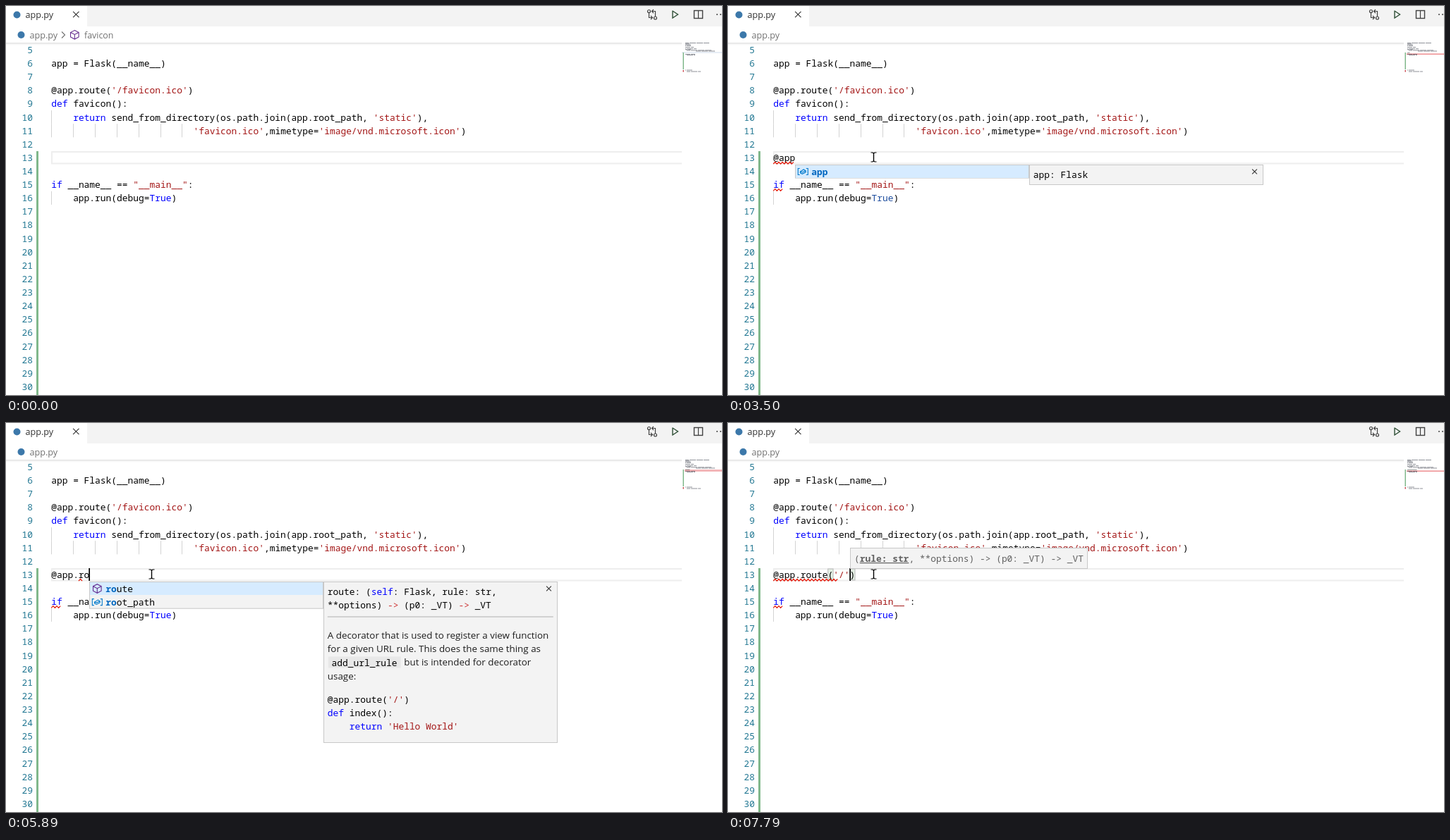
Recreate the animation shown at these times as an HTML page with a canvas. Size 1015 by 552 pixels, loop 8000 ms.

```html
<!DOCTYPE html>
<html lang="en">
<head>
<meta charset="utf-8">
<title>Editor completion</title>
<style>
html, body { margin: 0; width: 100%; height: 100%; overflow: hidden; background: #fff; }
canvas { display: block; }
</style>
</head>
<body>
<canvas id="stage" width="1015" height="552"></canvas>
<script>
const g = document.getElementById('stage').getContext('2d');
const LOOP = 8000, CW = 7.74, LH = 19.12, X0 = 64.2;
const MONO = '12.9px "Noto Sans Mono", monospace';
const UI = '"Open Sans", "Noto Sans", sans-serif';
const BLUE = '#0000ff', RED = '#a31515', PURPLE = '#652d90';

const colX = c => X0 + c * CW;
const rowY = n => 62 + (n - 5) * LH;

const code = {
  6: 'app = Flask(__name__)',
  8: "@app.route('/favicon.ico')",
  9: 'def favicon():',
  10: "    return send_from_directory(os.path.join(app.root_path, 'static'),",
  11: ' '.repeat(26) + "'favicon.ico',mimetype='image/vnd.microsoft.icon')",
  15: 'if __name__ == "__main__":',
  16: '    app.run(debug=True)'
};

// time, text on line 13, caret column (end of text if omitted)
const typing = [
  [0, ''], [2390, '@'], [2550, '@a'], [2700, '@ap'], [2780, '@app'],
  [4200, '@app.'], [5800, '@app.r'], [5890, '@app.ro'], [6040, '@app.rou'],
  [6110, '@app.rout'], [6190, '@app.route'], [6510, '@app.route()', 11],
  [7150, "@app.route('')", 12], [7310, "@app.route('/')", 13], [7460, "@app.route('/')", 14]
];
const caretOn = [[1460, 1990], [2390, 3330], [3820, 4670], [5210, 5660], [5800, 6980], [7150, 8000]];
const mousePath = [
  [70, 807, 491], [220, 843, 400], [320, 844, 340], [450, 833, 298],
  [690, 833, 298], [840, 690, 240], [1000, 440, 195], [1150, 280, 194], [1310, 212, 207],
  [1400, 212, 207], [1550, 209, 211], [1870, 209, 211], [1990, 206, 214]
];

// a leading "=" marks an attribute, otherwise a method
const routeList = ['route', 'run', 'save_session', '=secret_key', 'select_jinja_autoescape',
  '=send_file_max_age_default', 'send_static_file', '=session_cookie_name', '=session_interface',
  'shell_context_processor', '=shell_context_processors', 'should_ignore_error'];
const nameList = ['=app', 'abs', 'all', 'any', 'ascii', '=and', '=as', '=assert', '=async', '=await',
  '=ArithmeticError', '=AssertionError'];
const rList = ['route', 'run', 'register_blueprint', 'register_error_handler', '=request_class',
  '=response_class', '=root_path'];

// from, to, column, items, matched letters, docs kind, docs start
const popups = [
  [2630, 2700, 2, nameList, 1], [2700, 2780, 3, ['=app'], 2],
  [2780, 4200, 4, ['=app'], 3, 'app', 2860],
  [4280, 5800, 5, routeList, 0, 'route', 4370],
  [5800, 5890, 6, rList, 1, 'route', 0],
  [5890, 6040, 7, ['route', '=root_path'], 2, 'route', 0],
  [6040, 6110, 8, ['route'], 3, 'route', 0],
  [6110, 6190, 9, ['route'], 4, 'route', 0],
  [6190, 6510, 10, ['route'], 5, 'route', 0]
];
const squiggles = [[3500, 4810, 13, 0, 4], [4810, 6040, 13, 5, 6], [7620, 8000, 13, 0, 12], [3500, 8000, 15, 0, 2]];

const within = (t, a, b) => t >= a && t < b;

function rect(x, y, w, h, color) {
  g.fillStyle = color;
  g.fillRect(x, y, w, h);
}

function panel(x, y, w, h) {
  rect(x, y, w, h, '#c8c8c8');
  rect(x + 1, y + 1, w - 2, h - 2, '#f3f3f3');
}

// y is the middle of the line
function text(s, x, y, color = '#000', font = MONO, align = 'left') {
  g.font = font;
  g.textAlign = align;
  g.fillStyle = color;
  g.fillText(s, x, Math.round(y + 4.9));
}

function line(points, color, width = 1) {
  g.strokeStyle = color;
  g.lineWidth = width;
  g.beginPath();
  points.forEach(([x, y], i) => i ? g.lineTo(x, y) : g.moveTo(x, y));
  g.stroke();
}

function dot(x, y, r, color) {
  g.fillStyle = color;
  g.beginPath();
  g.arc(x, y, r, 0, 7);
  g.fill();
}

function cross(x, y, r, color = '#333') {
  line([[x - r, y - r], [x + r, y + r]], color, 1.1);
  line([[x - r, y + r], [x + r, y - r]], color, 1.1);
}

function source(s, x, y, boolColor = BLUE) {
  const parts = s.split(/('[^']*'|"[^"]*"|\b(?:def|return|if|True|self)\b)/);
  let col = 0;
  parts.forEach((p, i) => {
    const color = i % 2 === 0 ? '#000' : /^['"]/.test(p) ? RED : p === 'True' ? boolColor : BLUE;
    if (p.trim()) text(p, x + col * CW, y, color);
    col += p.length;
  });
}

function cube(x, y, color = PURPLE) {
  line([[x, y - 6.3], [x + 5.8, y - 3.3], [x + 5.8, y + 3.2], [x, y + 6.3],
    [x - 5.8, y + 3.2], [x - 5.8, y - 3.3], [x, y - 6.3], [x + 5.8, y - 3.3]], color, 1.1);
  line([[x - 5.8, y - 3.3], [x, y - .3], [x + 5.8, y - 3.3]], color, 1.1);
  line([[x, y - .3], [x, y + 6.3]], color, 1.1);
}

function field(x, y) {
  const c = '#007acc';
  for (const s of [-1, 1])
    line([[x + s * 4.5, y - 4.5], [x + s * 7, y - 4.5], [x + s * 7, y + 4.5], [x + s * 4.5, y + 4.5]], c, 1.1);
  line([[x - 3.8, y], [x + 1, y - 3], [x + 3.8, y - 1.2], [x + 3.8, y + .8], [x - 1, y + 3.3],
    [x - 3.8, y + 1.8], [x - 3.8, y], [x - 1, y + 1], [x + 3.8, y - 1.2]], c, 1.1);
}

function squiggle(x1, x2, y) {
  const pts = [];
  for (let x = x1, i = 0; x <= x2; x += 2.6, i++) pts.push([x, y + (i % 2 ? -1.3 : 1.3)]);
  line(pts, '#e51400', 1.2);
}

function header(t) {
  rect(0, 0, 1015, 29, '#f3f3f3');
  rect(0, 0, 115, 29, '#fff');
  dot(15.5, 12.5, 5, '#3c78aa');
  text('app.py', 27.5, 12.5, '#333', '12.6px ' + UI);
  cross(99.3, 12, 4.2);

  dot(21.5, 41, 5, '#3c78aa');
  text('app.py', 33.5, 41.3, '#717171', '12.6px ' + UI);
  if (t < 3190) {
    line([[79, 36.5], [83.5, 41], [79, 45.5]], '#717171', 1.1);
    cube(97.3, 40.8);
    text('favicon', 111, 41.3, '#717171', '12.4px ' + UI);
  }
  ['#e4e4e4', '#eeeeee', '#f7f7f7', '#fcfcfc'].forEach((c, i) => rect(0, 52 + i, 958, 1, c));

  const c = '#424242';
  g.strokeStyle = c;
  g.lineWidth = 1.2;
  for (const [x, y] of [[911.5, 7.5], [920.5, 17]]) {
    g.beginPath();
    g.arc(x, y, 2, 0, 7);
    g.stroke();
  }
  line([[911.5, 9.5], [911.5, 16.5], [916, 16.5]], c, 1.2);
  line([[914, 14], [916.5, 16.5], [914, 19]], c, 1.2);
  line([[920.5, 15], [920.5, 7.5], [916, 7.5]], c, 1.2);
  line([[918, 5], [915.5, 7.5], [918, 10]], c, 1.2);
  line([[945, 7], [952.5, 12], [945, 17], [945, 6.5]], '#2f4f36', 1.4);
  g.strokeStyle = c;
  g.strokeRect(975.5, 6.5, 12, 11);
  line([[981.5, 6.5], [981.5, 17.5]], c, 1.2);
  dot(1008, 12, 1, c);
  dot(1013, 12, 1, c);
}

function minimap(t, length) {
  const marks = [[52, 0, 34], [53.3, 0, 5], [54.5, 0, 8], [55.8, 0, 7], [58, 0, 12], [60.2, 0, 15],
    [61.3, 0, 8], [62.4, 2, 36], [63.5, 15, 28], [68, 0, 14], [69.2, 2, 12], [90.5, 0, 9], [92.5, 2, 20]];
  if (t < 3500) rect(958, 65.5, 57, 1, '#cfdcec');
  else {
    const wide = within(t, 4810, 6040);
    rect(962, wide ? 66 : 67.5, 53, wide ? 3 : 1.5, wide ? '#f3b5b8' : '#ee8d90');
  }
  for (const [y, x, w] of marks)
    for (let i = 0; i < w; i += 2)
      rect(963 + x + i, y, (i * 7 + y | 0) % 5 ? 1.8 : 1, 1, 'rgba(30,35,50,.55)');
  if (length) rect(963, 65.7, length * .9, 1, 'rgba(40,40,40,.5)');
  rect(959.5, 66, 1.5, 24, '#81b88b');
  rect(959.5, 91, 1.5, 2.5, '#ca4b51');
}

function editor(t, typed, caret) {
  for (let n = 5; n <= 30; n++) text(n, 38, rowY(n), '#237893', MONO, 'right');
  rect(43, 206, 3, 346, '#81b88b');

  rect(64, 206, 894, 2, '#eeeeee');
  rect(64, 222.5, 894, 2, '#eeeeee');
  rect(64, 206, 2, 18, '#eeeeee');

  for (const [n, count] of [[10, 1], [11, 7], [16, 1]])
    for (let i = 0; i < count; i++)
      rect(Math.floor(colX(i * 4)), rowY(n) - 9.5, 1, LH, '#d3d3d3');

  const boolColor = within(t, 2860, 4280) ? '#1f4e9e' : BLUE;
  for (const n in code) source(code[n], X0, rowY(+n), boolColor);

  if (caret === 11 || caret === 14)
    for (const c of [10, typed.length - 1]) {
      rect(colX(c) - .4, 206.5, CW + .6, 17, '#b9b9b9');
      rect(colX(c) + .6, 207.5, CW - 1.4, 15, '#e4f0e4');
    }
  source(typed, X0, rowY(13));
  for (const [a, b, n, c1, c2] of squiggles)
    if (within(t, a, b)) squiggle(colX(c1), colX(c2), rowY(n) + 7.8);
  if (caretOn.some(([a, b]) => within(t, a, b))) rect(Math.round(colX(caret)) - .7, 206, 1.7, 18, '#000');
}

function docs(x, kind, t) {
  const tx = x + 5.8;
  if (kind === 'app') {
    panel(x, 225, 332, 29);
    text('app: Flask', tx, 239);
  } else {
    panel(x, 225, 332, 229);
    source('route: (self: Flask, rule: str,', tx, 239);
    text('**options)    (p0: _VT)    _VT', tx, 258);
    for (const c of [11, 24]) text('->', tx + c * CW, 258, t < 5800 ? '#000' : '#cd3131');
    rect(tx, 274.5, 320, 1, '#b0b0b0');
    const prose = (s, px, y) => text(s, px, y, '#1e1e1e', '13.4px ' + UI);
    prose('A decorator that is used to register a view function', tx, 301);
    prose('for a given URL rule. This does the same thing as', tx, 320.5);
    rect(tx + 1, 331.5, 103, 16, '#e8e8e8');
    text('add_url_rule', tx + 5.8, 339.8);
    prose('but is intended for decorator', tx + 108.5, 339.5);
    prose('usage:', tx, 359);
    source("@app.route('/')", tx, 392);
    source('def index():', tx, 411);
    source("    return 'Hello World'", tx, 430);
    if (t < 5430) rect(x + 320.5, 226, 10.5, 90.5, '#c6c6c6');
  }
  cross(x + 319.5, 235, 3.4);
}

function suggest([, , col, items, matched, kind, start], t) {
  const x = Math.floor(colX(col));
  panel(x, 225, 332, items.length * 19.1 + .5);
  rect(x + 1, 226, 330, 18, '#d6ebff');
  items.forEach((item, i) => {
    const y = 235 + i * LH;
    const name = item.replace('=', '');
    if (item[0] === '=') field(x + 11.3, y);
    else cube(x + 11.3, y);
    const head = name.slice(0, matched);
    text(head, x + 23.3, y, '#0066bf', 'bold ' + MONO);
    text(name.slice(matched), x + 23.3 + matched * CW, y);
  });
  if (items === routeList) rect(x + 321, 343, 10, 19, t < 5040 ? '#c6c6c6' : '#d0d0d0');
  if (kind && t >= start) docs(x + 332, kind, t);
}

function signature(col) {
  const x = Math.round(colX(col) + .4), tx = x + 6, y = 192.5, c = '#616161';
  panel(x, 177, 337, 30);
  text('(', tx, y, c);
  text('rule: str', tx + CW, y, c, 'bold ' + MONO);
  rect(tx + CW, 198, CW * 9, 1.2, c);
  text(', **options) -> (p0: _VT) -> _VT', tx + CW * 10, y, c);
}

function mouse(t) {
  if (t < mousePath[0][0]) return;
  let i = mousePath.findIndex(p => p[0] > t);
  if (i < 0) i = mousePath.length - 1;
  const [ta, xa, ya] = mousePath[i - 1], [tb, xb, yb] = mousePath[i];
  const k = Math.min(1, (t - ta) / (tb - ta));
  const x = Math.round(xa + (xb - xa) * k) + .5, y = Math.round(ya + (yb - ya) * k) + .5;
  line([[x, y - 6], [x, y + 6]], '#000', 1.4);
  for (const s of [-1, 1])
    line([[x - 4, y + s * 6.5], [x - 1.5, y + s * 6.5], [x, y + s * 5.5],
      [x + 1.5, y + s * 6.5], [x + 4, y + s * 6.5]], '#000', 1.2);
}

function draw(t) {
  rect(0, 0, 1015, 552, '#fff');
  const [, typed, at] = typing.filter(e => e[0] <= t).pop();
  const caret = at || typed.length;
  editor(t, typed, caret);
  header(t);
  minimap(t, typed.length);
  popups.filter(p => within(t, p[0], p[1])).forEach(p => suggest(p, t));
  if (within(t, 6590, 7460) || t >= 7790) signature(caret);
  mouse(t);
}

const began = performance.now();
function tick() {
  draw((performance.now() - began) % LOOP);
  requestAnimationFrame(tick);
}
tick();
</script>
</body>
</html>
```
